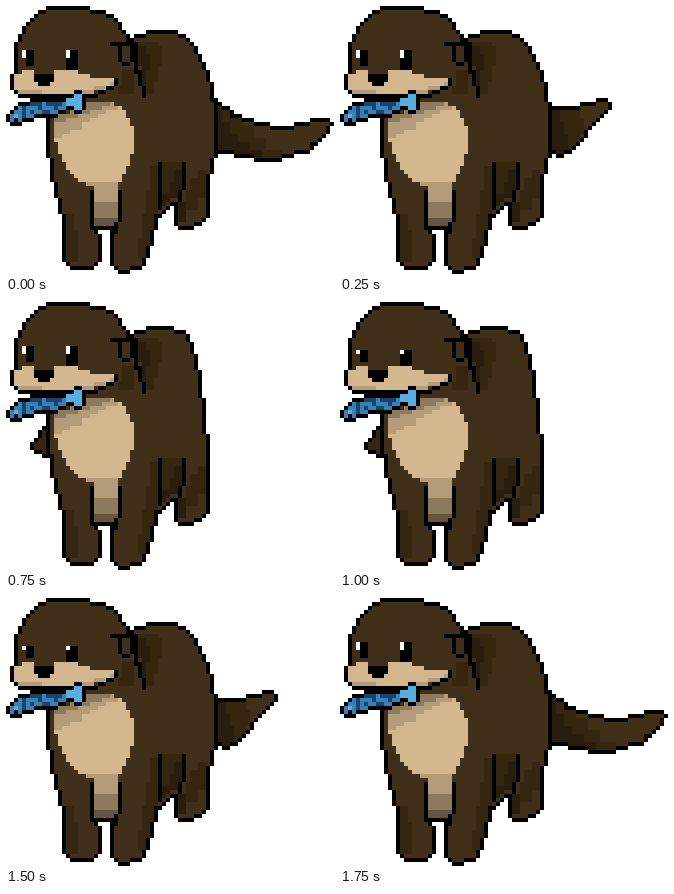
These frames come from a looping animation (328 px wide and 268 px high, 2 s). An HTML page without scripts:

```html
<!DOCTYPE html>
<html lang="en">
<head>
<meta charset="utf-8">
<title>Otter</title>
<style>
html, body { margin: 0; width: 100%; height: 100%; overflow: hidden; background: #fff; }
svg { display: block; width: 328px; height: 268px; shape-rendering: crispEdges; }

.fur { fill: #403019; }
.dim { fill: #35260f; }
.dark { fill: #291d0e; }
.tan { fill: #d3b78f; }
.tan2 { fill: #b59c79; }
.tan3 { fill: #8d795d; }
.tan4 { fill: #655540; }
.blue { fill: #3383b8; }
.sky { fill: #55aedd; }
.navy { fill: #1e4169; }
.white { fill: #fff; }
.inked { filter: url(#ink); }

/* each pose is shown and hidden in hard steps */
.pose { visibility: hidden; animation: 2s step-end infinite; }
.long { animation-name: long; }
.curl { animation-name: curl; }
.wide { animation-name: wide; }
.slim { animation-name: slim; }
.peek { animation-name: peek; }
.open { animation-name: open; }
.half { animation-name: half; }
.shut { animation-name: shut; }
@keyframes long { 0%, 87.5%, 100% { visibility: visible } 12.5% { visibility: hidden } }
@keyframes curl { 0%, 25%, 87.5%, 100% { visibility: hidden } 12.5%, 75% { visibility: visible } }
@keyframes wide { 0%, 75%, 100% { visibility: visible } 25% { visibility: hidden } }
@keyframes slim { 0%, 75%, 100% { visibility: hidden } 25% { visibility: visible } }
@keyframes peek { 0%, 62.5%, 100% { visibility: hidden } 37.5% { visibility: visible } }
@keyframes open { 0%, 87.5%, 100% { visibility: visible } 50% { visibility: hidden } }
@keyframes half { 0%, 62.5%, 87.5%, 100% { visibility: hidden } 50%, 75% { visibility: visible } }
@keyframes shut { 0%, 75%, 100% { visibility: hidden } 62.5% { visibility: visible } }
</style>
</head>
<body>
<svg viewBox="0 0 82 67" role="img" aria-label="Otter wagging its tail">
  <defs>
    <!-- one-cell outline around a shape -->
    <filter id="ink" filterUnits="userSpaceOnUse" x="-1" y="-1" width="84" height="69" color-interpolation-filters="sRGB">
      <feOffset in="SourceAlpha" dx="1" result="r"/>
      <feOffset in="SourceAlpha" dx="-1" result="l"/>
      <feOffset in="SourceAlpha" dy="1" result="d"/>
      <feOffset in="SourceAlpha" dy="-1" result="u"/>
      <feMerge>
        <feMergeNode in="r"/><feMergeNode in="l"/><feMergeNode in="d"/><feMergeNode in="u"/>
        <feMergeNode in="SourceGraphic"/>
      </feMerge>
    </filter>
  </defs>

  <g class="pose long">
    <g class="inked">
      <path class="fur" d="M52 24H53V25H54V26H56V28H59V29H62V30H66V31H72V30H76V29H81V30H80V32H79V33H78V34H76V36H72V37H69V38H62V37H57V36H52z"/>
      <path class="dim" d="M52 24H53V25H54V26H56V28H59V30H62V33H65V36H69V38H62V37H57V36H52z"/>
      <path class="dark" d="M52 26H54V29H56V32H58V34H61V36H64V38H62V37H57V36H52z"/>
    </g>
  </g>
  <g class="pose curl">
    <g class="inked">
      <path class="fur" d="M52 25H53V26H60V25H64V24H67V26H66V27H65V28H64V29H63V30H62V31H61V33H60V34H59V35H58V36H56V37H54V36H52z"/>
      <path class="dim" d="M52 26H60V28H61V32H60V34H59V35H58V36H56V37H54V36H52z"/>
      <path class="dark" d="M52 26H55V29H56V32H57V36H56V37H54V36H52z"/>
    </g>
  </g>
  <g class="pose peek">
    <path class="dim inked" d="M11 32H9V34H8V35H7V37H9V38H11z"/>
  </g>

  <g class="inked fur">
    <path class="pose wide" d="M32 12V8H35V7H43V8H45V9H46V10H47V12H48V14H49V16H50V19H51V24H52V38H51V42H50V53H49V54H47V55H43V49H41V50H40V51H39V52H32z"/>
    <path class="pose slim" d="M32 12V8H35V7H42V8H45V10H46V13H47V17H48V24H49V33H50V53H49V54H47V55H43V49H41V50H40V51H39V52H32z"/>
    <path d="M11 28V38H12V44H13V48H14V52H15V64H16V65H22V64H23V57H22V55H27V65H28V66H31V65H34V63H35V60H36V56H37V52H38V20H20V28z"/>
    <path d="M10 1H21V2H25V3H27V4H28V6H29V7H30V9H31V12H32V28H11V22H3V21H2V17H3V9H4V7H5V5H6V4H7V3H8V2H10z"/>
  </g>

  <!-- fur shading -->
  <path class="dim" d="M33 9H38V10H39V15H38V19H37V22H35V20H34V15H33z"/>
  <path class="dark" d="M33 10H35V12H36V16H35V20H34V15H33z"/>
  <path class="dim" d="M39 39H44V46H43V48H41V49H40V50H39zM46 43H48V41H50V48H48V51H45V46H46z"/>
  <path class="dark" d="M42 41H44V46H43V48H41V49H40V50H39V47H41V44H42zM43 49H45V54H43z"/>
  <path class="dim" d="M29 16H32V22H28V20H29zM15 52H17V56H18V64H15zM36 40H38V52H37V56H36V60H35V63H33V58H34V52H35V46H36z"/>

  <!-- chest and belly -->
  <path class="tan" d="M20 24H27V25H29V26H30V28H31V30H32V37H31V40H30V42H29V44H28V46H22V45H20V44H18V43H17V42H16V41H15V39H14V37H13V34H12V27H16V25H20z"/>
  <path class="tan2" d="M20 24H27V25H28V26H25V27H23V28H21V29H19V31H16V32H14V33H12V27H16V25H20zM20 44H28V46H22V45H20z"/>
  <path class="tan3" d="M20 24H26V25H24V26H21V27H18V28H15V29H12V27H16V25H20z"/>
  <path class="tan2" d="M22 46H28V49H22z"/>
  <path class="tan3" d="M22 49H28V53H22z"/>
  <path class="tan4" d="M22 53H28V54H27V55H22z"/>

  <!-- inner lines -->
  <path d="M21 46h1v10h-1zM28 46h1v8h-1zM27 54h1v3h-1zM22 55h5v1h-5z
    M38 39h1v12h-1zM44 39h1v7h-1zM43 46h1v3h-1z
    M30 8h2v1h-2zM26 9h6v1h-6zM28 10h1v4h-1zM29 14h2v1h-2zM31 10h1v4h-1z
    M32 9h1v8h-1zM33 16h1v4h-1zM34 20h1v3h-1z"/>

  <!-- muzzle -->
  <path class="tan" d="M2 17V21H3V22H20V21H24V20H26V19H27V18H21V17H18V16H12V17H7V16H4V17z"/>
  <path class="tan2" d="M3 21H9V22H3zM17 21H22V20H26V19H27V20H25V21H22V22H17z"/>
  <path d="M4 22h16v1H4zM27 18h1v2h-1zM25 20h2v1h-2zM23 21h2v1h-2zM20 22h3v1h-3z"/>
  <path d="M7 17h5v2H7zM8 19h3v1H8z"/>

  <!-- eyes -->
  <g class="pose open">
    <path d="M5 11h2v4H5zM15 11h3v5h-3z"/>
    <path class="white" d="M4 11h1v2H4zM15 11h1v2h-1z"/>
  </g>
  <g class="pose half">
    <path d="M5 12h2v3H5zM15 12h3v4h-3z"/>
    <path class="white" d="M4 12h1v1H4zM15 12h1v1h-1z"/>
  </g>
  <path class="pose shut" d="M4 14h4v1H4zM14 14h5v1h-5z"/>

  <!-- fish -->
  <g class="inked">
    <path class="blue" d="M6 24H15V23H17V22H19V26H17V25H15V26H13V27H7V28H4V29H1V27H2V26H3V25H6z"/>
    <path class="sky" d="M15 23H17V22H19V26H17V25H15zM2 27h1v1H2z"/>
    <path class="navy" d="M6 24h3v1H6zM10 24h4v1h-4zM4 25h1v3H4zM8 25h1v1H8zM6 26h1v1H6zM9 26h2v1H9zM12 25h1v1h-1z"/>
    <path d="M2 28h1v1H2z"/>
  </g>
</svg>
</body>
</html>
```
